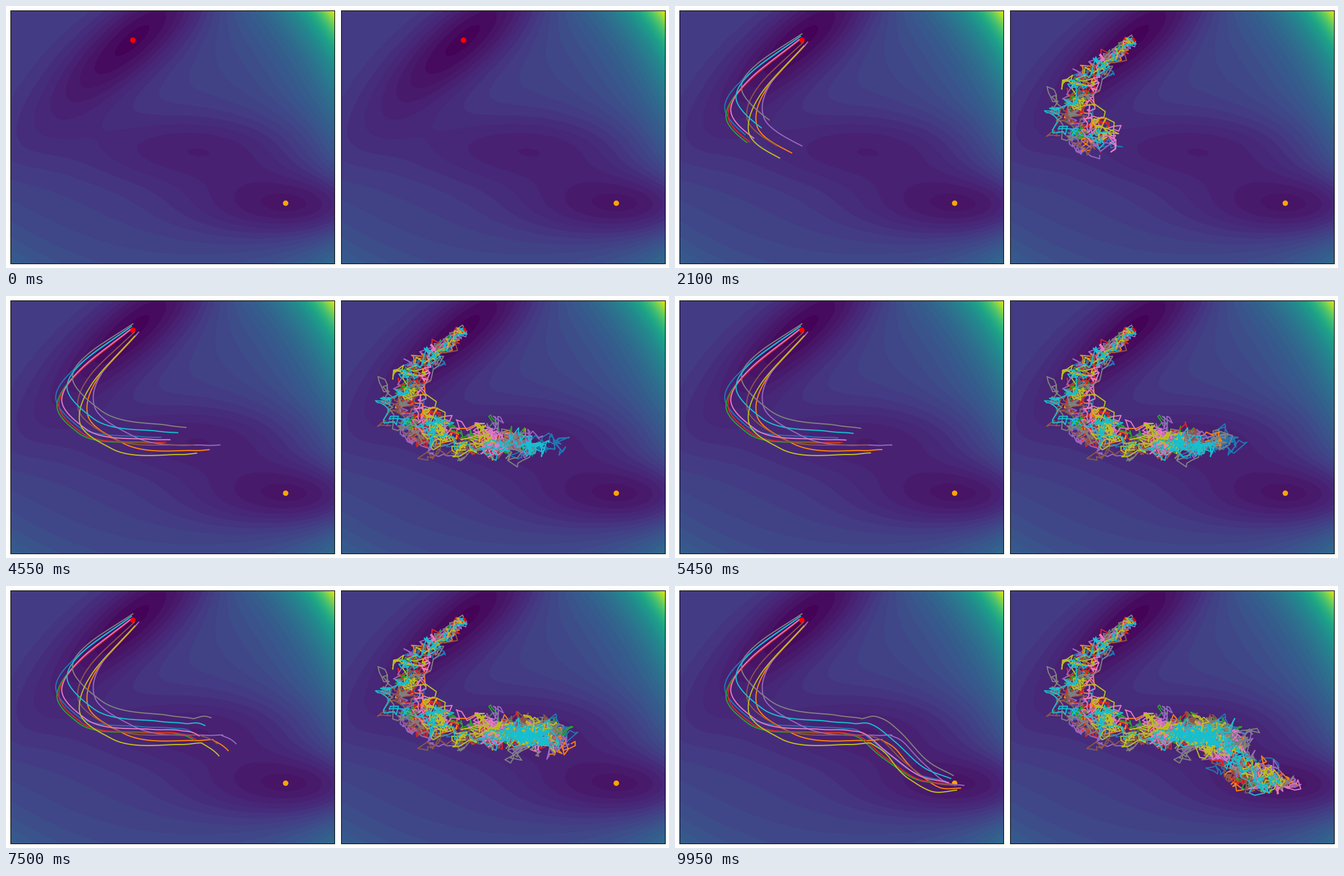
A matplotlib script that plays this animation: 1189 px wide and 471 px high, repeating every 10 s.

```python
import numpy as np
import matplotlib.pyplot as plt
from matplotlib.animation import FuncAnimation

W, H, DPI = 1189, 471, 100
FRAMES, STEPS, LAST = 200, 550, 9.95
LEFT, RIGHT, TOP, BOTTOM = 8, 589, 8, 463
SHIFT = 593  # distance between the two panels
XLIM, YLIM = (-1.5, 1.0), (-.5, 1.7)

# Key poses of the bundle: time (s), centre x, y, spread in x, y (pixels)
KEYS = np.array([
    (0, 227, 62, 11, 10), (.6, 146, 133, 25, 24), (1.25, 117, 189, 42, 35),
    (2.1, 167, 243, 62, 31), (3.6, 285, 261, 70, 24),
    (4.55, 319.5, 261.5, 64, 21), (6.2, 332.5, 262.5, 54, 20),
    (7.3, 360, 270.5, 48, 29.5), (8.6, 405, 310, 43, 37),
    (9.3, 452, 345, 33, 25), (LAST, 498, 355, 20, 12),
])
BEND = 6  # the key where the path has a corner

# Place of each track inside the bundle, in units of the spread
EPS = np.array([
    (-.65, -.35), (.7, .7), (-.6, .1), (-.52, .07), (1, .3),
    (.28, .3), (-.4, -.15), (.05, -1.2), (.35, 1), (-.18, -.75),
])


def potential(x, y):
    """Müller-Brown surface."""
    terms = [
        (-200, -1, 0, -10, 1, 0), (-100, -1, 0, -10, 0, .5),
        (-170, -6.5, 11, -6.5, -.5, 1.5), (15, .7, .6, .7, -1, 1),
    ]
    total = 0
    for amp, a, b, c, x0, y0 in terms:
        dx, dy = x - x0, y - y0
        total = total + amp * np.exp(a * dx**2 + b * dx * dy + c * dy**2)
    return total


def banded_surface():
    w, h = RIGHT - LEFT, BOTTOM - TOP
    x = XLIM[0] + (XLIM[1] - XLIM[0]) * (np.arange(w) + .5) / w
    y = YLIM[0] + (YLIM[1] - YLIM[0]) * (np.arange(h) + .5) / h
    z = potential(*np.meshgrid(x, y))
    middle = np.floor(z / 20) * 20 + 10
    return plt.get_cmap("viridis")((middle + 160) / 980, bytes=True)


def to_data(p):
    """Pixels of the left panel to surface coordinates."""
    x = np.interp(p[..., 0], (LEFT, RIGHT), XLIM)
    y = np.interp(p[..., 1], (TOP, BOTTOM), YLIM[::-1])
    return np.stack([x, y], axis=-1)


def smooth_curve(keys, t):
    """Cubic Hermite curve through the keys."""
    kt, p = keys[:, 0], keys[:, 1:]
    m = np.gradient(p, kt, axis=0)
    i = np.clip(np.searchsorted(kt, t, side="right") - 1, 0, len(kt) - 2)
    h = (kt[i + 1] - kt[i])[:, None]
    u = (t - kt[i])[:, None] / h
    return ((1 + 2 * u) * (1 - u)**2 * p[i] + u * (1 - u)**2 * h * m[i]
            + u**2 * (3 - 2 * u) * p[i + 1] + u**2 * (u - 1) * h * m[i + 1])


def noisy_tracks(mean, spread):
    """Mean-reverting random walk that keeps to the spread of the bundle."""
    rng = np.random.default_rng(5)
    std = spread * .55
    kick = np.minimum(.9, np.array([8, 7.2]) / std)
    keep = np.sqrt(1 - kick**2)
    state = EPS
    walk = np.empty((len(EPS), STEPS, 2))
    for k in range(STEPS):
        walk[:, k] = mean[k] + std[k] * state
        state = keep[k] * state + kick[k] * rng.standard_normal(EPS.shape)
    return walk


times = np.linspace(0, LAST, STEPS)
before = times < KEYS[BEND, 0]
curve = np.vstack([smooth_curve(KEYS[:BEND + 1], times[before]),
                   smooth_curve(KEYS[BEND:], times[~before])])
mean, spread = curve[:, :2], curve[:, 2:]
steady = to_data(mean + EPS[:, None] * spread)
noisy = to_data(noisy_tracks(mean, spread))

fig = plt.figure(figsize=(W / DPI, H / DPI), dpi=DPI, facecolor="white")
surface = banded_surface()


def make_panel(shift):
    ax = fig.add_axes([(LEFT + shift) / W, 1 - BOTTOM / H,
                       (RIGHT - LEFT) / W, (BOTTOM - TOP) / H])
    ax.imshow(surface, extent=XLIM + YLIM, origin="lower", aspect="auto",
              interpolation="nearest", zorder=0)
    ax.set(xlim=XLIM, ylim=YLIM, xticks=[], yticks=[])
    ax.scatter(-.558, 1.442, color="red", zorder=1)
    ax.scatter(.623, .028, color="orange", zorder=1)
    return [ax.plot([], [], color=f"C{i}", lw=1.5)[0] for i in range(len(EPS))]


lines = make_panel(0) + make_panel(SHIFT)
tracks = [*steady, *noisy]


def update(frame):
    n = 1 + frame * (STEPS - 1) // (FRAMES - 1)
    for line, track in zip(lines, tracks):
        line.set_data(track[:n, 0], track[:n, 1])
    return lines


anim = FuncAnimation(fig, update, frames=FRAMES, interval=50,
                     init_func=lambda: update(0), repeat=True, repeat_delay=0)
plt.show()
```
